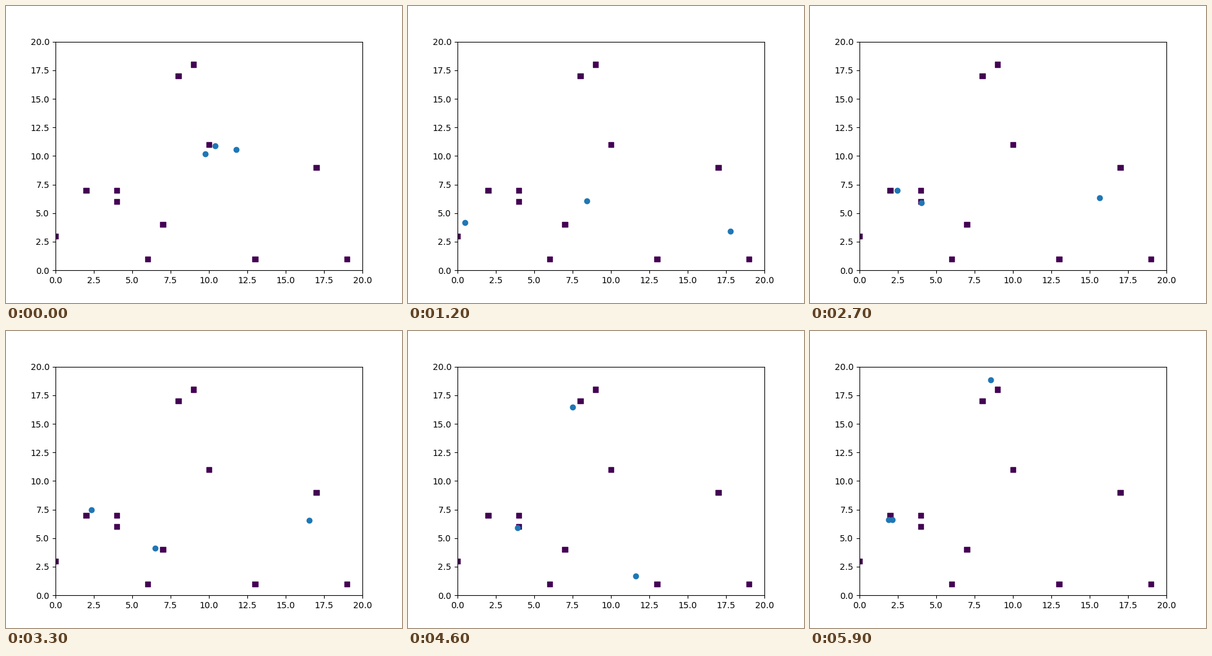
A matplotlib script for the animation above (6000 ms loop, 640 px wide and 480 px high).

```python
import numpy as np
import matplotlib.pyplot as plt
from matplotlib.animation import FuncAnimation

FRAMES = 60
INTERVAL = 100
SIZE = 20

SITES = {"A": (0, 3), "B": (2, 7), "C": (4, 7), "D": (4, 6),
         "E": (6, 1), "F": (7, 4), "G": (8, 17), "H": (9, 18),
         "I": (10, 11), "J": (13, 1), "K": (17, 9), "L": (19, 1)}
TURNS = {"p": (11.2, 13.3), "q": (11, 21.5)}  # turning points away from sites
PLACES = {**SITES, **TURNS}

# Every leg runs between two key points, at an even pace, by way of some places.
KEY_STEPS = [0, 12, 20, 33, 41, 51, 59]
WALKERS = [
    ("CD A CDBCDB B GH q",
     [(9.77, 10.17), (0.5, 4.17), (1.46, 7.14), (2.34, 7.47),
      (4.36, 12.89), (8.8, 20.6), (8.56, 18.84)]),
    ("p FE EDC FE CD AB",
     [(10.41, 10.88), (8.43, 6.06), (6.46, 0.81), (6.5, 4.12),
      (5.86, 4.22), (0.61, 2.87), (1.9, 6.62)]),
    ("K L JK L J FD",
     [(11.79, 10.56), (17.8, 3.41), (13.44, 1.13), (16.54, 6.55),
      (16.46, 1.14), (7.11, 3.86), (2.14, 6.62)]),
]


def along(points, share):
    """Points at the given shares of a polyline's length."""
    points = np.array(points, float)
    lengths = np.hypot(*np.diff(points, axis=0).T)
    travelled = np.concatenate([[0], np.cumsum(lengths)])
    at = share * travelled[-1]
    return np.column_stack([np.interp(at, travelled, axis) for axis in points.T])


def walk(legs, keys):
    path = np.zeros((FRAMES, 2))
    for n, via in enumerate(legs.split()):
        first, last = KEY_STEPS[n:n + 2]
        points = [keys[n], *(PLACES[p] for p in via), keys[n + 1]]
        path[first:last + 1] = along(points, np.linspace(0, 1, last - first + 1))
    return path


paths = np.array([walk(*w) for w in WALKERS])

plt.rcParams["font.family"] = "DejaVu Sans"
fig, ax = plt.subplots(figsize=(6.4, 4.8), dpi=100)
ax.set_xlim(0, SIZE)
ax.set_ylim(0, SIZE)
ax.scatter(*zip(*SITES.values()), c=np.zeros(len(SITES)), marker="s",
           cmap="viridis")
walkers, = ax.plot([], [], "o", color="#1f77b4")


def update(i):
    walkers.set_data(*paths[:, i].T)
    return walkers,


anim = FuncAnimation(fig, update, frames=FRAMES, interval=INTERVAL,
                     repeat=True, repeat_delay=0)
plt.show()
```
